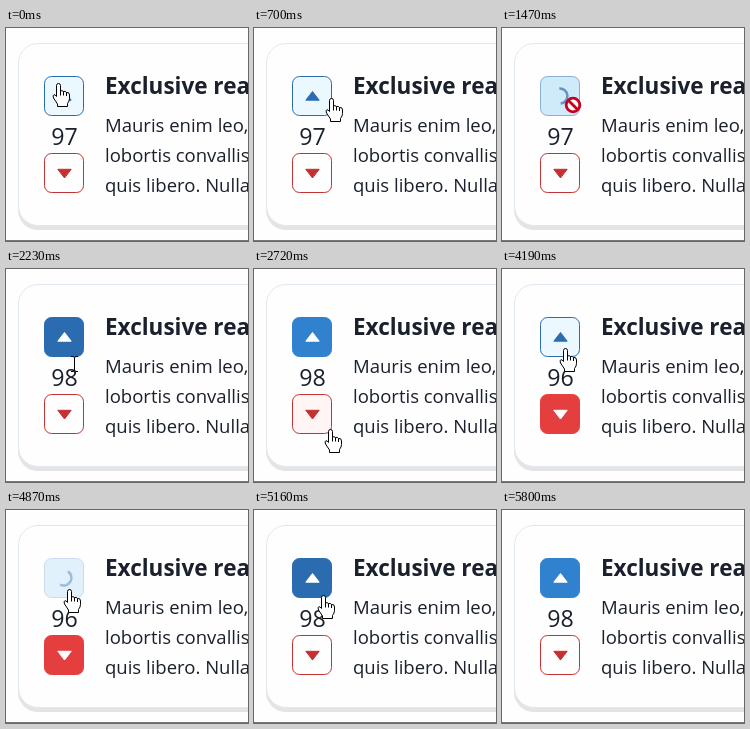
Write an HTML page that moves like this. It is 242x213 px and loops after 6450 ms.

```html
<!DOCTYPE html>
<html lang="en">
<head>
<meta charset="utf-8">
<title>Vote buttons</title>
<style>
html, body { margin: 0; width: 100%; height: 100%; overflow: hidden; background: #fefefe; }
svg { display: block; width: 242px; height: 213px; }
text { font: 18.5px "Open Sans", "Noto Sans", sans-serif; fill: #1a202c; }
.title { font-size: 22.5px; font-weight: 700; }
#count { font-size: 23.2px; text-anchor: middle; }
</style>
</head>
<body>
<svg viewBox="0 0 242 213">
  <rect x="12" y="19" width="300" height="183" rx="20" fill="#e4e4e6"/>
  <rect x="12.5" y="15.5" width="300" height="182" rx="19.5" fill="#fefefe" stroke="#e2e8f0"/>
  <rect y="212" width="242" height="1" fill="#777"/>
  <text class="title" x="99" y="66">Exclusive rea</text>
  <text x="99" y="104">Mauris enim leo,</text>
  <text x="99" y="134">lobortis convallis</text>
  <text x="99" y="164">quis libero. Nulla</text>
  <text id="count" x="58.4" y="117"></text>

  <g id="up" transform="translate(58 68)">
    <rect x="-19.5" y="-19.5" width="39" height="39" rx="7"/>
    <path class="tri" d="M.5-4.5 7.2 4.2H-6.2Z" stroke-linejoin="round"/>
    <path class="arc" d="M5.4-5.4A7.64 7.64 0 0 1-5.4 5.4" fill="none" stroke-width="2.5"/>
  </g>
  <g id="down" transform="translate(58 145)">
    <rect x="-19.5" y="-19.5" width="39" height="39" rx="7"/>
    <path class="tri" d="M.5 5 7.2-3.7H-6.2Z" stroke-linejoin="round"/>
    <path class="arc" d="M5.4-5.4A7.64 7.64 0 0 1-5.4 5.4" fill="none" stroke-width="2.5"/>
  </g>

  <g id="cursor">
    <g id="hand" transform="translate(.5 .5)" fill="#fff" stroke="#000" stroke-linejoin="round">
      <path d="M-2 13V2Q-2 0 0 0T2 2V7.5Q3.5 6.5 5 8 6.8 7.2 8 9 11 8.4 11 11.5V15Q11 17.5 9 20V23H-1V20.5L-5 14.5Q-6 11.8-4.6 11.2-3.4 11-2 13Z"/>
      <path d="M2 7.5V12M5 8V12M8 9V12.5" fill="none"/>
    </g>
    <path id="arrow" d="M.5.5V16.5L4.2 13 6.7 18.5 9 17.5 6.5 12H11.5Z" fill="#fff" stroke="#000"/>
    <path id="beam" d="M-3-7.5H-1L.5-6.5 2-7.5H4M.5-6.5V6.5M-3 7.5H-1L.5 6.5 2 7.5H4" fill="none" stroke="#000"/>
    <g id="no" stroke="#c8001e" stroke-width="2.8">
      <circle r="6.8" fill="#fff"/>
      <path d="M-4.8-4.8 4.8 4.8"/>
    </g>
  </g>
</svg>
<script>
const LOOP = 6450;
const $ = id => document.getElementById(id);

const themes = {
  up: { ink: '#2b6cb0', plain: '#fefefe', hover: '#ebf8ff', press: '#bee3f8', load: '#bee3f8',
        fade: '#a6cae9', on: '#3182ce', onHover: '#2b6cb0' },
  down: { ink: '#c53030', plain: '#fefefe', hover: '#fff5f5', press: '#fed7d7', load: '#fed7d7',
          fade: '#f2a9a9', on: '#e53e3e', onHover: '#c53030' }
};

// [time, state, opacity, spinner turn]
const states = {
  up: [
    [0, 'hover'], [1350, 'press'], [1470, 'load', .72, -50], [1590, 'load', .45, 46],
    [1720, 'onHover', .6], [1840, 'onHover', .85], [1960, 'onHover'], [2350, 'on'],
    [3380, 'fade', .7], [3530, 'plain'], [4190, 'hover'], [4590, 'press'],
    [4870, 'load', .45, -15], [5020, 'onHover', .7], [5160, 'onHover'], [5280, 'on']
  ],
  down: [
    [0, 'plain'], [2480, 'hover'], [3110, 'press'], [3260, 'load', .5, -15],
    [3380, 'onHover', .7], [3530, 'onHover'], [3910, 'on'], [5020, 'fade', .7], [5160, 'plain']
  ]
};

const counts = [[0, 97], [1720, 98], [3380, 96], [5020, 98]];

// [time, shape, hotspot x, hotspot y]
const pointer = [
  [0, 'hand', 52, 55], [150, 'hand', 53, 55], [300, 'hand', 59, 57], [420, 'hand', 68, 62],
  [560, 'hand', 74, 66], [700, 'hand', 77, 70], [820, 'hand', 75, 74], [940, 'hand', 71, 77],
  [1470, 'no', 71, 77], [1720, 'hand', 71, 77], [2230, 'beam', 68, 95], [2350, 'beam', 70, 115],
  [2480, 'hand', 73, 141], [2600, 'hand', 75, 155], [2720, 'hand', 76, 160],
  [3910, 'beam', 67, 110], [4040, 'hand', 63, 79], [4730, 'no', 63, 79], [4870, 'hand', 63, 79],
  [5160, 'hand', 69, 85], [5280, 'arrow', 92, 110], [5400, 'beam', 130, 141],
  [5520, 'beam', 161, 161], [5670, 'arrow', 199, 194], [5800, 'none', 0, 0]
];

const latest = (keys, t) => keys.findLast(key => key[0] <= t);

function drawButton(name, t) {
  const [, state, opacity = 1, turn = 0] = latest(states[name], t);
  const theme = themes[name], filled = state.startsWith('on'), loading = state === 'load';
  const [box, tri, arc] = $(name).children;
  $(name).setAttribute('opacity', opacity);
  box.setAttribute('fill', theme[state]);
  box.setAttribute('stroke', filled ? theme[state] : theme.ink);
  box.setAttribute('stroke-opacity', opacity);
  const ink = filled ? '#fff' : theme.ink;
  tri.setAttribute('fill', ink);
  tri.setAttribute('stroke', ink);
  tri.setAttribute('opacity', filled ? opacity : 1);
  tri.style.display = loading ? 'none' : '';
  arc.setAttribute('stroke', theme.ink);
  arc.setAttribute('transform', `rotate(${turn})`);
  arc.style.display = loading ? '' : 'none';
}

function draw(now) {
  const t = now % LOOP;
  drawButton('up', t);
  drawButton('down', t);
  $('count').textContent = latest(counts, t)[1];
  const [, shape, x, y] = latest(pointer, t);
  for (const part of $('cursor').children) part.style.display = part.id === shape ? '' : 'none';
  $('cursor').setAttribute('transform', `translate(${x} ${y})`);
}

const start = performance.now();
function tick() {
  draw(performance.now() - start);
  requestAnimationFrame(tick);
}
tick();
</script>
</body>
</html>
```
